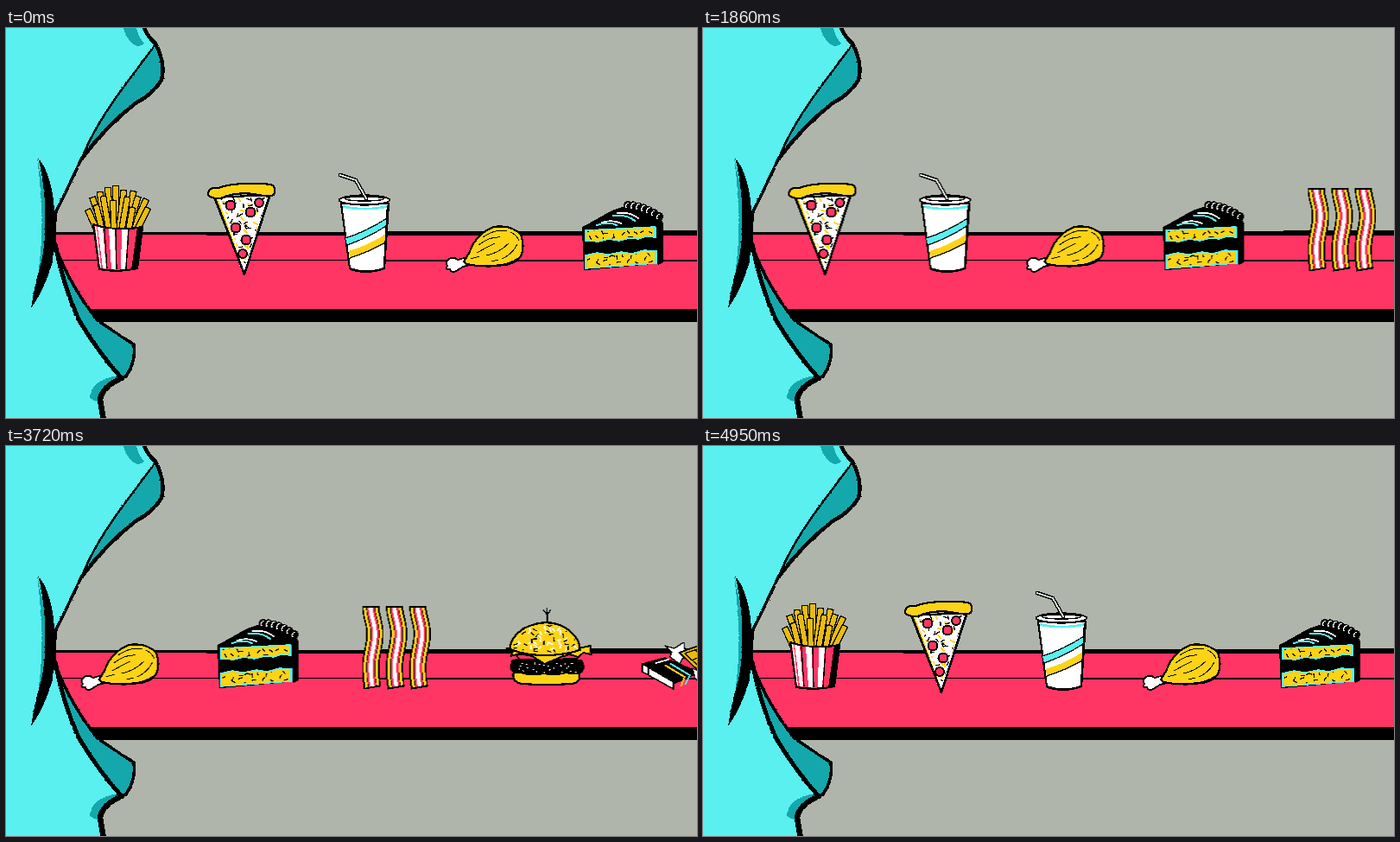
An HTML page that plays this animation: 800 px wide and 451 px high, repeating every 8.85 s.

```html
<!DOCTYPE html>
<html lang="en">
<head>
<meta charset="utf-8">
<title>Snack belt</title>
<style>
  html, body { margin: 0; width: 100%; height: 100%; overflow: hidden; background: #b0b5ab; }
  svg { display: block; width: 100vw; height: 100vh; shape-rendering: crispEdges; }
  path, ellipse, circle { stroke-linejoin: round; stroke-linecap: round; }
  .k { fill: #000; }
  .c { fill: #5af0f0; }
  .t { fill: #14a8ac; }
  .p { fill: #ff3564; }
  .y { fill: #fdd316; }
  .g { fill: #e9bb10; }
  .w { fill: #fff; }
  .o { stroke: #000; stroke-width: 2.2; }
  .l { fill: none; stroke: #000; stroke-width: 1.3; }
  .lw { fill: none; stroke: #fff; stroke-width: 1.8; }
  .lc { fill: none; stroke: #5af0f0; stroke-width: 2; }
  .ly { fill: none; stroke: #fdd316; stroke-width: 2; }
</style>
</head>
<body>
<svg viewBox="0 0 800 451" preserveAspectRatio="none">
  <defs>
    <filter id="rough" filterUnits="userSpaceOnUse" x="-20" y="-20" width="840" height="491" color-interpolation-filters="sRGB">
      <feTurbulence type="fractalNoise" baseFrequency=".3" numOctaves="2" seed="4"/>
      <feDisplacementMap in="SourceGraphic" scale="2" xChannelSelector="R" yChannelSelector="G"/>
    </filter>
    <clipPath id="cheese"><path d="M248 196L303 194L276 278Z"/></clipPath>
    <clipPath id="bun"><path d="M656 234Q656 222 670 212Q695 201 716 212Q731 222 732 235Q695 243 656 234Z"/></clipPath>
    <clipPath id="sponge"><path d="M673 235L748 232L748 241L673 245ZM673 264L750 260L750 271L673 276Z"/></clipPath>
  </defs>

  <rect width="800" height="451" fill="#b0b5ab"/>
  <path class="p" d="M40 238H800V327H40Z"/>
  <path class="k" d="M40 236L420 235.500L800 234V240.500L420 240L40 239Z"/>
  <path class="k" d="M90 325H800V340H90Z"/>
  <path class="k" d="M40 268H800V270H420V269H40Z"/>

  <g id="belt">
    <g id="fries">
      <g id="sticks"></g>
      <path class="p o" d="M101 227Q128 236 158 230L152 278Q132 283 108 279Z"/>
      <path class="w" d="M106 230L112 231L116 278L112 278ZM119 232L126 233L127 279L122 279ZM134 233L141 233L138 279L133 279ZM103 229L105 230L110 277L109 277Z"/>
      <path class="k" d="M152 231L159 229L153 279L145 280Z"/>
      <path class="l" d="M114 232L117 278M127 233L128 279M142 233L139 279"/>
    </g>

    <g>
      <path class="w o" d="M241 196L306 193L276 285Z"/>
      <path class="ly" style="stroke-width:3" d="M245 200L273 277"/>
      <g clip-path="url(#cheese)">
        <path id="gold" class="ly"/>
        <path id="herbs" class="l"/>
      </g>
      <g class="p" stroke="#000" stroke-width="2">
        <circle cx="260" cy="205" r="5.500"/><circle cx="283" cy="213" r="5.500"/>
        <circle cx="293" cy="202" r="5"/><circle cx="266" cy="231" r="5.500"/>
        <circle cx="278" cy="245" r="5.500"/><circle cx="274" cy="261" r="5"/>
      </g>
      <path class="l" style="stroke-width:2.500" d="M242 197L276 285L305 194"/>
      <path class="y o" d="M234 191Q235 184 246 185Q258 180 280 180Q300 179 309 182Q313 186 310 193Q303 196 293 193Q272 189 256 194Q247 199 239 196Q234 195 234 191Z"/>
    </g>

    <g>
      <path class="w o" d="M388 203L443 203L438 278Q418 285 398 278Z"/>
      <path class="c" d="M393 243Q418 235 441 220L440.500 229Q418 243 395 251ZM390 205Q415 211 442 205L442 208Q415 213 390 208Z"/>
      <path class="y" d="M397 258Q420 251 440 238L439 248Q420 259 398 266Z"/>
      <path class="l" d="M393 243Q418 235 441 220M395 251Q418 243 440 229M398 266Q420 259 439 248"/>
      <path class="l" style="stroke-width:2.500" d="M442 206L438 278Q418 285 399 279"/>
      <ellipse class="w o" cx="415" cy="199" rx="29" ry="5.500"/>
      <ellipse class="l" cx="415" cy="197.500" rx="22" ry="2.500"/>
      <path class="l" style="stroke-width:4.500" d="M387 170L405 176L417 197"/>
      <path class="lw" d="M387 170L405 176L417 197"/>
    </g>

    <g>
      <path class="w o" style="stroke-width:1.800" d="M538 264L523 268Q518 264 513 267Q508 270 511 275Q508 280 514 279Q516 284 521 281Q526 278 529 276L541 273Z"/>
      <path class="y o" d="M530 270Q536 262 540 251Q550 235 565 230Q585 227 596 239Q601 252 596 264Q589 274 574 274Q552 277 533 273Z"/>
      <path class="l" style="stroke-width:1" d="M552 242Q566 232 580 235M547 251Q560 241 572 242M545 260Q556 254 566 249M556 263Q571 260 582 249M574 267Q586 262 592 250M538 267L548 264M584 236Q592 240 594 246M562 270L570 268"/>
      <path class="l" style="stroke-width:2.500" d="M550 275Q580 277 594 266"/>
    </g>

    <g>
      <path class="k o" d="M668 231L702 212L720 206Q744 206 759 224V271L670 279Z"/>
      <path id="ruffle" class="k"/>
      <path id="shine" class="lw" style="stroke-width:1.200"/>
      <path class="lw" d="M690 225Q702 221 712 226M708 214Q722 212 732 220"/>
      <path class="lc" d="M684 228Q697 223 707 228M703 217Q718 215 728 223"/>
      <path class="y" stroke="#5af0f0" stroke-width="1.500" d="M671 234L751 230V242L741 241L732 244L722 243L710 246L698 244L686 247L671 246ZM671 263L684 260L697 262L712 259L725 261L739 257L752 258L752 272L671 278Z"/>
      <path id="crumbs" class="l" clip-path="url(#sponge)"/>
      <path class="k" d="M754 229L761 225V271L755 274Z"/>
      <path class="lc" d="M752 231V242M753 258V272"/>
    </g>

    <g id="bacon"></g>

    <g transform="translate(352.700)">
      <path class="l" style="stroke-width:2" d="M696 206V193"/>
      <path class="l" d="M692 190L696 195L700 190M696 188V195"/>
      <path class="y o" d="M657 262L733 262Q736 274 724 275Q695 277 667 275Q655 273 657 262Z"/>
      <path class="k" d="M655 247Q695 241 736 247Q742 255 737 262Q728 266 718 263Q705 267 692 264Q678 267 665 263Q653 263 653 255Z"/>
      <path id="sear" class="lw" style="stroke-width:1"/>
      <path class="p o" style="stroke-width:1.500" d="M660 241L735 240L731 246L664 247Z"/>
      <path class="y o" style="stroke-width:2" d="M649 234L658 233L733 234L746 231L747 241L738 239L732 244L722 241L712 244L693 252L679 243L664 240L654 243L656 238Z"/>
      <path class="y o" d="M653 235Q653 222 669 211Q695 198 717 210Q734 221 734 236Q715 242 694 242Q670 242 653 235Z"/>
      <g clip-path="url(#bun)">
        <path id="seedsW" class="lw"/>
        <path id="seedsK" class="l"/>
      </g>
    </g>

    <g transform="translate(492)">
      <path class="w o" style="stroke-width:1.300" d="M693 231L704 234L715 227L717 240L710 252L699 244L701 238Z"/>
      <path class="g o" style="stroke-width:1.800" d="M710 239L740 228L765 245L734 262Z"/>
      <path class="l" d="M716 240L739 232L758 245L735 257ZM728 236L747 251M724 248L749 238"/>
      <path class="k o" style="stroke-width:1.500" d="M667 252L693 245L733 262L703 275V281L667 260Z"/>
      <path class="w o" style="stroke-width:1.500" d="M667 252L703 273V281L667 261Z"/>
      <path class="l" d="M674 257V265"/>
      <path class="lw" d="M683 251L697 247"/>
      <path class="lc" d="M700 252L722 265L717 275"/>
      <path class="ly" d="M694 254L716 267L712 277"/>
      <path class="w o" style="stroke-width:1.300" d="M725 257L735 262L753 264L744 270L739 269L735 275L728 269Z"/>
    </g>

    <use href="#fries" x="1232"/>
  </g>

  <g filter="url(#rough)">
    <path class="c" d="M-30 -30H145L160 0Q165 11 173 19L140 63Q103 112 88 150Q75 178 58 212Q55 232 57 252Q65 294 84 337Q106 374 133 404Q110 416 107 428L114 452V480H-30Z"/>
    <path class="t" d="M133 -10Q139 17 152 21Q160 20 160 17Q152 11 149 -10ZM97 428Q98 407 129 402L135 405Q111 414 108 430L104 432Z"/>
    <path class="t" d="M173 19Q184 40 180 59Q171 75 150 86Q113 115 87 152Q104 113 140 63ZM57 252Q74 298 106 338Q132 356 148 366Q151 384 139 403L133 404Q106 374 84 337Q65 294 57 252Z"/>
    <path class="t" d="M36 150Q43 205 41 245Q39 280 33 308L44 290L50 210Z"/>
    <path class="k" d="M37 150Q51 166 55 200Q60 238 54 270Q45 302 29 324Q34 292 41 270Q47 242 45 202Q43 172 37 150Z"/>
    <path class="l" style="stroke-width:4.500" d="M157 -8Q163 10 173 18Q185 40 180 60Q171 76 150 87Q115 114 88 151"/>
    <path class="l" style="stroke-width:2.500" d="M173 19L140 63Q103 112 88 150"/>
    <path class="l" style="stroke-width:3.500" d="M88 150Q75 178 58 212Q55 232 57 252"/>
    <path class="l" style="stroke-width:5" d="M57 250Q65 294 84 337Q106 374 133 404"/>
    <path class="l" style="stroke-width:3.500" d="M57 252Q74 298 106 338Q132 356 148 366Q151 384 139 403L133 404"/>
    <path class="l" style="stroke-width:6.500" d="M134 405Q111 415 109 430L114 460"/>
  </g>
</svg>

<script>
  const $ = id => document.getElementById(id);

  const rng = seed => () => (seed = seed * 16807 % 2147483647) / 2147483647;

  // Short strokes on a jittered grid
  function scatter(id, seed, x, y, w, h, gap, len) {
    const rnd = rng(seed);
    let d = '';
    for (let j = y; j < y + h; j += gap)
      for (let i = x; i < x + w; i += gap) {
        const a = rnd() * Math.PI, px = i + rnd() * gap, py = j + rnd() * gap;
        d += `M${px.toFixed(1)} ${py.toFixed(1)}l${(len * Math.cos(a)).toFixed(1)} ${(len * Math.sin(a)).toFixed(1)}`;
      }
    $(id).setAttribute('d', d);
  }

  scatter('gold', 71, 245, 194, 60, 84, 11, 4);
  scatter('herbs', 305, 245, 194, 60, 84, 8.5, 4);
  scatter('crumbs', 92, 670, 231, 82, 48, 8, 4);
  scatter('seedsW', 518, 654, 203, 80, 40, 8, 3.5);
  scatter('seedsK', 47, 654, 203, 80, 40, 9, 4);
  scatter('sear', 83, 659, 250, 72, 10, 6, 1.5);

  const line = (d, color, width, cap = 'butt') =>
    `<path d="${d}" fill="none" stroke="${color}" stroke-width="${width}" style="stroke-linecap:${cap}"/>`;

  // Top x, top y, foot x of each fry
  const fries = [
    [127, 186, 128], [118, 188, 122], [109, 193, 115], [136, 191, 131], [147, 192, 138],
    [101, 199, 113], [161, 201, 147], [113, 198, 119], [152, 198, 142], [96, 213, 105],
    [140, 199, 134], [163, 211, 152], [124, 203, 125], [105, 208, 111], [146, 211, 142]
  ];
  $('sticks').innerHTML = fries.map(([x, y, foot]) => {
    const d = `M${x} ${y}L${foot} 233`;
    return line(d, '#000', 8, 'square') + line(d, '#e9bb10', 5.5, 'square');
  }).join('');

  const strip = x => {
    const wave = `C${x} 197 ${x + 5} 204 ${x + 5} 217C${x + 5} 232 ${x} 240 ${x} 256Q${x} 268 ${x + 2} `;
    const d = `M${x} 186.500${wave}278`;
    return line(`M${x} 184.500${wave}280`, '#000', 20) + line(d, '#fdd316', 16.5) +
      line(d, '#000', 10.5) + line(d, '#ff3564', 9) + line(d, '#fff', 4.5);
  };
  $('bacon').innerHTML = [844.5, 872, 899].map(strip).join('');

  // Piped frosting along the back of the cake
  let puffs = '', shine = '';
  for (let i = 0; i < 7; i++) {
    const x = 720 + i * 6, y = 205 + i * i * .36;
    puffs += `M${x - 5} ${y}a5 5 0 1 0 10 0a5 5 0 1 0 -10 0`;
    shine += `M${x - 2} ${y + 3}q-1 -5 3 -6`;
  }
  $('ruffle').setAttribute('d', puffs);
  $('shine').setAttribute('d', shine);

  // Belt waits, advances in 30 ms steps, then cuts back to the start
  const LOOP = 8850, START = 990, END = 4950, STEP = 4.641;
  const count = (END - START) / 30;
  const at = (x, time, easing = 'linear') =>
    ({ transform: `translate(${x}px, 0px)`, offset: time / LOOP, easing });
  $('belt').animate([
    at(0, 0),
    at(0, START, `steps(${count}, end)`),
    at(-STEP * count, END),
    at(0, END),
    at(0, LOOP)
  ], { duration: LOOP, iterations: Infinity });
</script>
</body>
</html>
```
